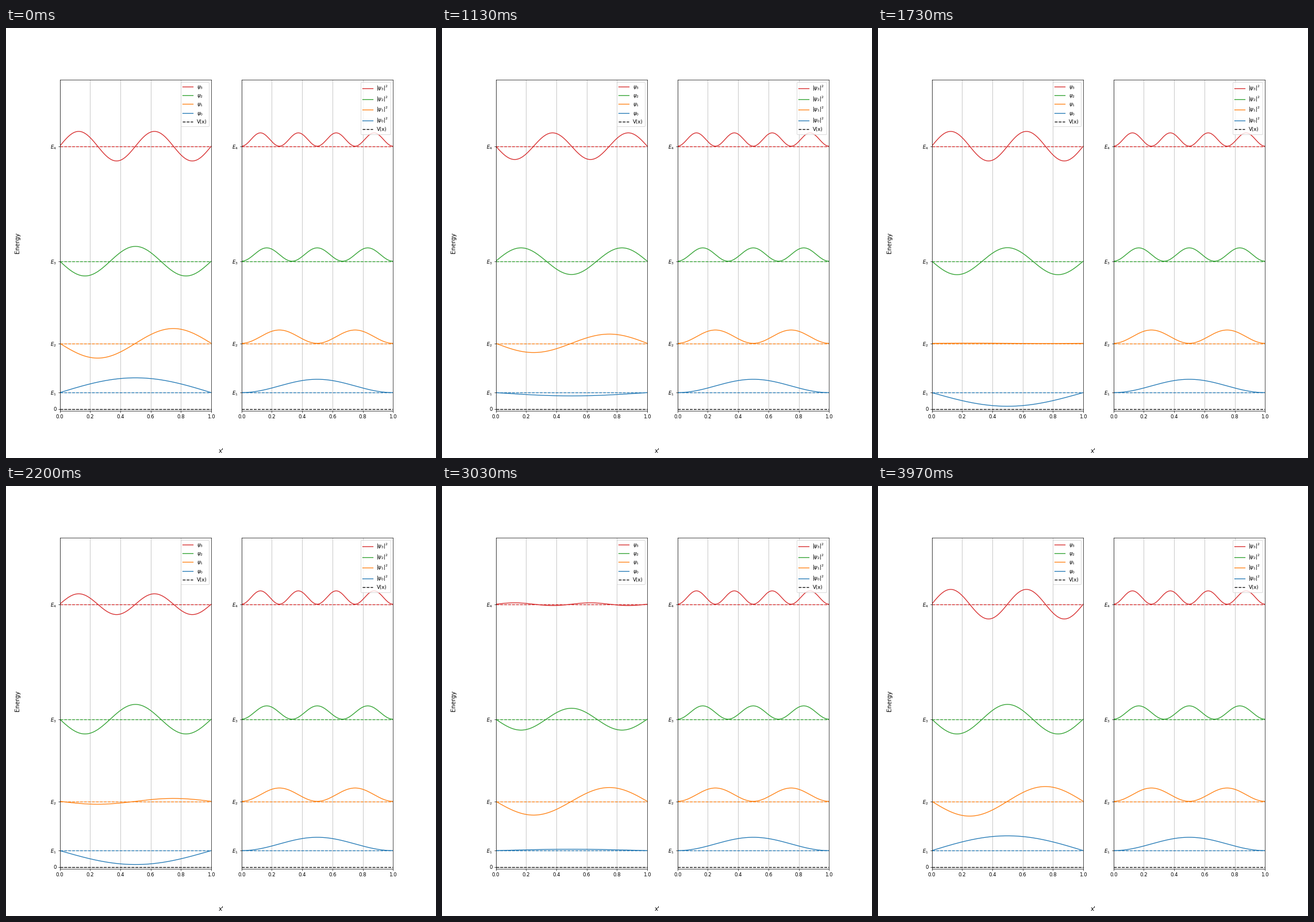
Recreate the animation shown at these times as a matplotlib script. Size 748 by 748 pixels, loop 4010 ms.

```python
import numpy as np
import matplotlib.pyplot as plt
from matplotlib.animation import FuncAnimation

# Particle in an infinite well: stationary states and their densities
SIZE_PX = 748
SIZE_IN = 12
LOOP_MS = 4010
FRAMES = 200
POSES = 120
WAVE_SCALE = np.pi
DENSITY_SCALE = 2
SIGNS = (1, -1, -1, 1)

x = np.linspace(0, 1, 500)
levels = np.arange(1, 5)
energies = (levels * np.pi) ** 2 / 2
states = [s * np.sqrt(2) * np.sin(n * np.pi * x) for s, n in zip(SIGNS, levels)]

fig, (wave_ax, density_ax) = plt.subplots(
    1, 2, figsize=(SIZE_IN, SIZE_IN), dpi=SIZE_PX / SIZE_IN)
fig.supxlabel("x'")
fig.supylabel("Energy")


def draw_panel(ax, curves, label):
    lines = []
    for i in reversed(range(len(levels))):
        line, = ax.plot(x, energies[i] + curves[i], color=f"C{i}",
                        label=label.format(i))
        ax.plot([0, 1], [energies[i]] * 2, "--", color=f"C{i}")
        lines.insert(0, line)
    ax.plot([0, 1], [0, 0], "k--", label="V(x)")
    ax.set_xlim(0, 1)
    ax.set_ylim(-0.5, energies[-1] + 20)
    ax.set_yticks(energies, [f"$E_{n}$" for n in levels])
    ax.grid()
    ax.legend(loc="upper right")
    return lines


waves = draw_panel(wave_ax, [WAVE_SCALE * s for s in states], r"$\psi_{}$")
draw_panel(density_ax, [DENSITY_SCALE * s ** 2 for s in states],
           r"$|\psi_{}|^2$")
wave_ax.set_yticks([0, *energies], ["0"] + [f"$E_{n}$" for n in levels])


def update(frame):
    # Poses advance at 30 per second, the last one closing the cycle.
    # The ground state turns once per loop; level n turns n^2 times.
    pose = min((6 * (frame + 1) + 1) // 10, POSES - 1)
    phase = 2 * np.pi * pose / (POSES - 1)
    for n, energy, state, line in zip(levels, energies, states, waves):
        line.set_ydata(energy + WAVE_SCALE * state * np.cos(n ** 2 * phase))
    return waves


anim = FuncAnimation(fig, update, frames=FRAMES, interval=LOOP_MS / FRAMES,
                     repeat=True, repeat_delay=0)
plt.show()
```
